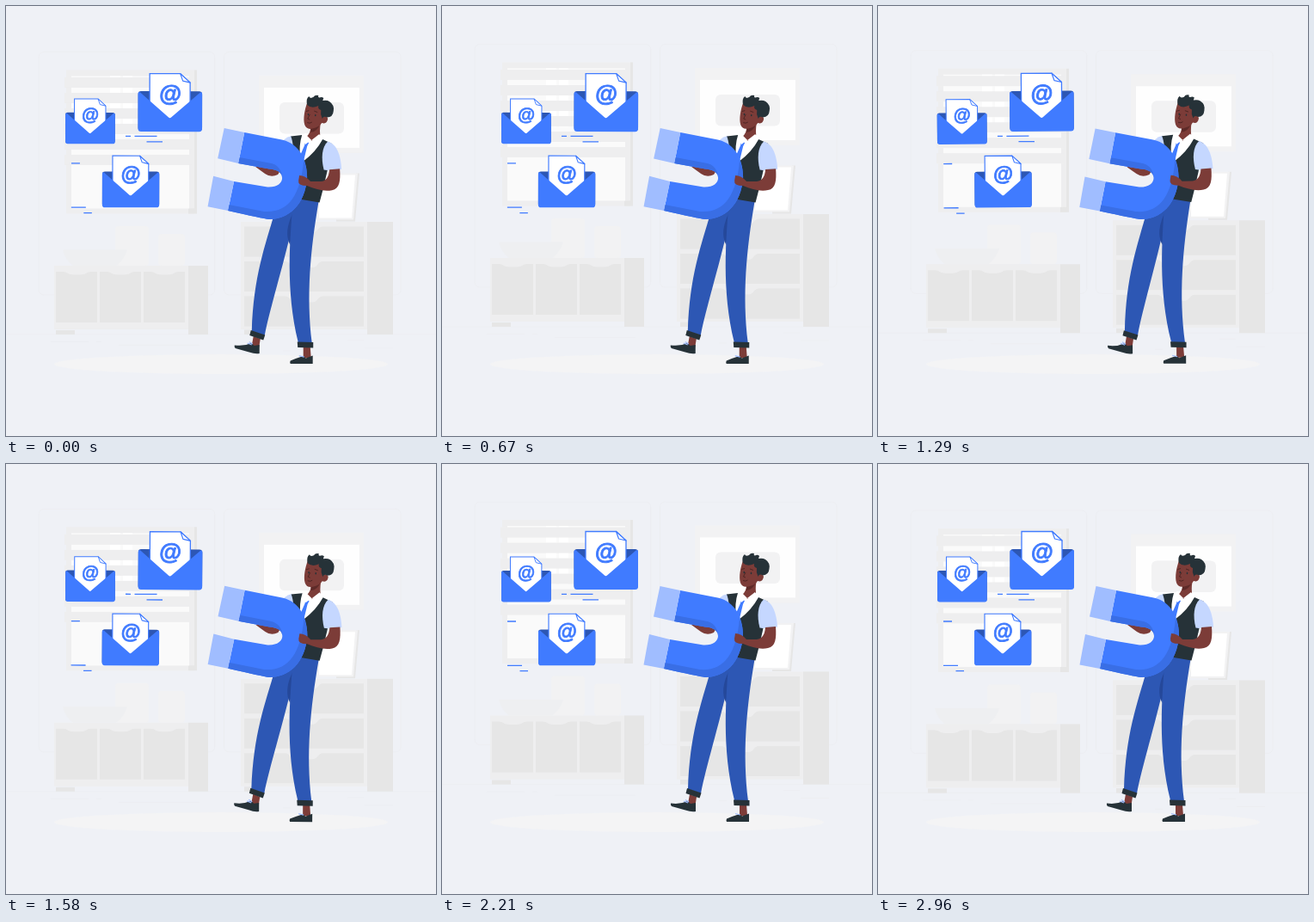
Recreate the animation shown at these times as an HTML page. Size 500 by 500 pixels, loop 3 s.

```html
<!DOCTYPE html>
<html lang="en">
<head>
<meta charset="utf-8">
<title>Email magnet</title>
<style>
  html, body { margin: 0; width: 100%; height: 100%; overflow: hidden; background: #eff1f6; }
  svg { display: block; width: 100%; height: 100%; }
  .blue { fill: #407bff; }
  .shade { fill: #396ee5; }
  .navy { fill: #2d57b4; }
  .pale { fill: #a0bdff; }
  .shirt { fill: #c5d7ff; }
  .ink { fill: #263238; }
  .skin { fill: #7c3c38; }
  .g1 { fill: #e6e6e6; }
  .g2 { fill: #eeeeef; }
  .g3 { fill: #f2f2f3; }
  .white { fill: #fff; }
  .at { font: italic bold 26.5px "Liberation Sans", Arial, sans-serif; text-anchor: middle; stroke: #407bff; stroke-width: .9; }
  .line { fill: none; stroke: #407bff; stroke-width: 1.3; }
  .hair { fill: none; stroke: #e9e9eb; stroke-width: .4; }
</style>
</head>
<body>
<svg viewBox="0 0 500 500">
  <defs>
    <g id="mail">
      <rect class="navy" y="1" width="74.5" height="46" rx="3.5"/>
      <path d="M13.5 38V-19.5H49L60.5 -9V38Z" fill="#fff" stroke="#407bff" stroke-width="1.3"/>
      <path d="M49 -19.5 52 -11 60.5 -9Z" fill="#fff" stroke="#407bff" stroke-width="1.2" stroke-linejoin="round"/>
      <text class="blue at" x="37" y="13">@</text>
      <path class="blue" d="M0 4Q0 1 2.5 2.5L35.500 31.5Q37 33 38.500 31.5L72 2.5Q74.5 1 74.5 4V44.5Q74.5 48 71 48H3.5Q0 48 0 44.5Z"/>
    </g>
    <path id="drawer" class="g1" d="M0 0H48Q51 0 54 4Q56 7 60 7H79Q83 7 85 4Q88 0 91 0H139V35H0Z"/>
    <path id="box" class="g1" d="M0 0H8Q12 0 14 2Q17 3.5 24.5 3.5Q32 3.5 35 2Q37 0 41 0H48V59H0Z"/>
  </defs>

  <g id="room">
    <!-- wall panels and floor lines -->
    <rect class="hair" x="38.2" y="54" width="204.5" height="282.500" rx="5.700"/>
    <rect class="hair" x="253.5" y="54" width="205.5" height="282.500" rx="5.700"/>
    <path class="hair" d="M0 382.5H500M417 398.500H450M322 401.500H331M397 389.500H416M52 391H96M105 391H111M131 395H225"/>

    <!-- window with blinds -->
    <rect class="g2" x="70" y="75" width="149" height="167"/>
    <path class="g1" d="M219 75H222V242H212V236H219Z"/>
    <rect x="76" y="82" width="137" height="154" fill="#fafafa"/>
    <path class="white" d="M121 82H133V150H121ZM136 82H147V150H136Z"/>
    <g id="slats" class="g2"></g>

    <!-- wall pictures -->
    <rect class="g3" x="294" y="81.500" width="122" height="90"/>
    <rect x="300" y="95.5" width="111" height="70" fill="#fefefe"/>
    <rect class="g3" x="318" y="112.5" width="75" height="36.5" rx="6"/>
    <path class="g1" d="M407 195H411L406 251H384V248H402Z"/>
    <path class="g3" d="M362 195H409L404 249H362Z"/>
    <path class="white" d="M364 197H406L402 247H364Z"/>

    <!-- right cabinet -->
    <rect class="g2" x="273" y="251.5" width="148" height="125"/>
    <path class="g1" d="M420 251.5H450V382.5H420ZM277 377H300L298 382.5H277Z"/>
    <use href="#drawer" x="277" y="257"/>
    <use href="#drawer" x="277" y="297.5"/>
    <use href="#drawer" x="277" y="338"/>

    <!-- left cabinet -->
    <rect class="g3" x="127" y="256.5" width="39" height="46" rx="4"/>
    <rect class="g3" x="177" y="265.5" width="31" height="37" rx="4"/>
    <path d="M66 284H141Q137 296 128 302.5H78Q69 296 66 284Z" fill="#eeeff1"/>
    <rect class="g2" x="56" y="302.5" width="157" height="74"/>
    <path class="g1" d="M212 302.5H235V382.5H212ZM58 377.5H80V382.5H58Z"/>
    <use href="#box" x="58" y="309.5"/>
    <use href="#box" x="109" y="309.5"/>
    <use href="#box" x="160" y="309.5"/>
  </g>

  <ellipse cx="250" cy="416.5" rx="194" ry="11.5" fill="#f4f4f5"/>

  <g id="mails">
    <use href="#mail" transform="translate(153.5 98)"/>
    <use href="#mail" transform="translate(69 123.2) scale(.775)"/>
    <use href="#mail" transform="translate(112 191.6) scale(.89)"/>
    <path class="line" d="M139 151.3H145M149.5 151.3H175.5M163.5 157.8H182M76 183H86M76 234.3H93M90.5 240.7H100"/>
  </g>

  <g id="man">
    <!-- feet -->
    <path class="skin" d="M288 384 296 387 294.5 397 286 395ZM346 396H354L355 409H346Z"/>
    <path class="ink" d="M266 394.5Q277 396 285.500 392L289 395 295 394V404Q290 405 283 402.5L267 398Q265.5 396.500 266 394.5Z"/>
    <path class="ink" d="M331 412.500Q338 409.5 346 407L349 409.5 357 406.5V416H331Q330 414.500 331 412.500Z"/>
    <path d="M281 392 286 394M283 390.5 287 393M341 406.5 347 408" fill="none" stroke="#a0bdff" stroke-width="1.2"/>

    <!-- trousers -->
    <path class="navy" d="M313 238C301 280 288 314 286 378L301 383C307 352 322 304 333 255L345 226 318 232Z"/>
    <path d="M335 238 330.5 278Q322 262 335 238Z" fill="#25489a"/>
    <path class="navy" d="M334 222C330 272 325 330 340 391L356 392C349 336 354 284 363.5 227Z"/>
    <path class="ink" d="M285 377 301.5 382.5 299.5 388.5 283.5 383ZM339 390.5 357.5 391V397.5L339.5 397Z"/>

    <!-- torso -->
    <path class="shirt" d="M332 151Q322 153 317 164L336 170Z"/>
    <path class="white" d="M340 152 348 148 367 151 372 157 352 196 335 180Z"/>
    <path class="ink" d="M331 151.5 344 150Q340 162 342 178L334 166Q333 156 331 151.5Z"/>
    <path class="blue" d="M348 157 352 159 350 163 345 184 340 178 347 162Z"/>
    <path class="ink" d="M368 155 379 160Q374 194 364.5 228.5L338 224 345 181Q360 170 368 155Z"/>
    <path class="shirt" d="M374 157.5C385 161 389 174 390 189.5Q380 192 369.5 190.5C366 177 367 164 374 157.5Z"/>

    <!-- head -->
    <path class="skin" d="M353 138 367 130Q364 141 365 150L355 157 349 152Q354 148 354 141Z"/>
    <path d="M354 142 365 137Q362 146 354 147Z" fill="#5d2a28"/>
    <path class="white" d="M349 150 344 153 348 161 353 157 367 154 364 149 355 156Z"/>
    <path class="skin" d="M350 112C347 121 345 131 347 138Q349 144 356 142.5Q364 141 367 136Q373 138 374 131Q373 127 368 128L367 114Z"/>
    <path class="ink" d="M350 115Q348 108 352 105Q353 108 357 106Q359 103 363 104Q362 106 364 106.500Q367 105 369 107L368 110Q373 109 376 111Q382 115 380.500 122Q380 129 373 129.500Q369 127 367.500 131Q365 126 366 121Q362 120 363 116Q355 120 350 115Z"/>
    <g class="ink">
      <ellipse cx="351.3" cy="126" rx=".8" ry="1.2"/>
      <ellipse cx="359.5" cy="127" rx=".8" ry="1.2"/>
    </g>
    <path d="M348.5 122.5 352 121.5M358 122 362 123.5M350 135.5Q353 137 355.5 135M353 126 350.5 131 353 132" fill="none" stroke="#43201f" stroke-width=".8"/>

    <!-- magnet and hands -->
    <path class="skin" d="M290 187Q302 184 319 191L316 196Q308 200 301 195Z"/>
    <path class="blue" d="M277 147 318 155C338 158 350 175 350 199C348 232 328 248 306 248Q298 247 258 238L265 204 304 210.5C315 211 321 206 321 200C321 193 314 190 306 189.500L270 183Z"/>
    <path class="shade" d="M259 231 300 239C328 241 342 221 346 180Q350 188 350 199C348 232 328 248 306 248Q298 247 258 238Z"/>
    <path class="shade" d="M271.300 176 306 182.500C316 184 321 191 321 200C321 193 314 190 306 189.500L270 183Z"/>
    <path class="pale" d="M253.5 142 277 147 270 183 246 177.5ZM241 198 265 204 258 238 234.5 233.5Z"/>
    <path class="skin" d="M376 190 388 189C389 203 388 212 379 214C370 216 360 213 350 209Q339 209 340 203L341 197Q348 197 354 204H366Q375 203 376 190Z"/>
  </g>
</svg>
<script>
  const el = id => document.getElementById(id);
  const PERIOD = 1500, LEAD = 41;

  el("slats").innerHTML = [0, 1, 2, 3, 4, 5]
    .map(i => `<rect x="68" y="${83.5 + 18 * i}" width="148" height="12"/>`).join("");

  // Triangle wave: 0 at the ends of the period, 1 in the middle.
  const tri = p => 1 - Math.abs(1 - 2 * (p - Math.floor(p)));

  function draw(ms) {
    const p = (ms + LEAD) / PERIOD;
    const tilt = 2 * tri(p + 0.25) - 1;
    el("room").setAttribute("transform", `translate(0 ${-10 * tri(p)})`);
    el("mails").setAttribute("transform", `rotate(${tilt} 148 160)`);
    el("man").setAttribute("transform", `rotate(${tilt} 312 260)`);
  }

  const start = performance.now();
  (function tick() {
    draw(performance.now() - start);
    requestAnimationFrame(tick);
  })();
</script>
</body>
</html>
```
